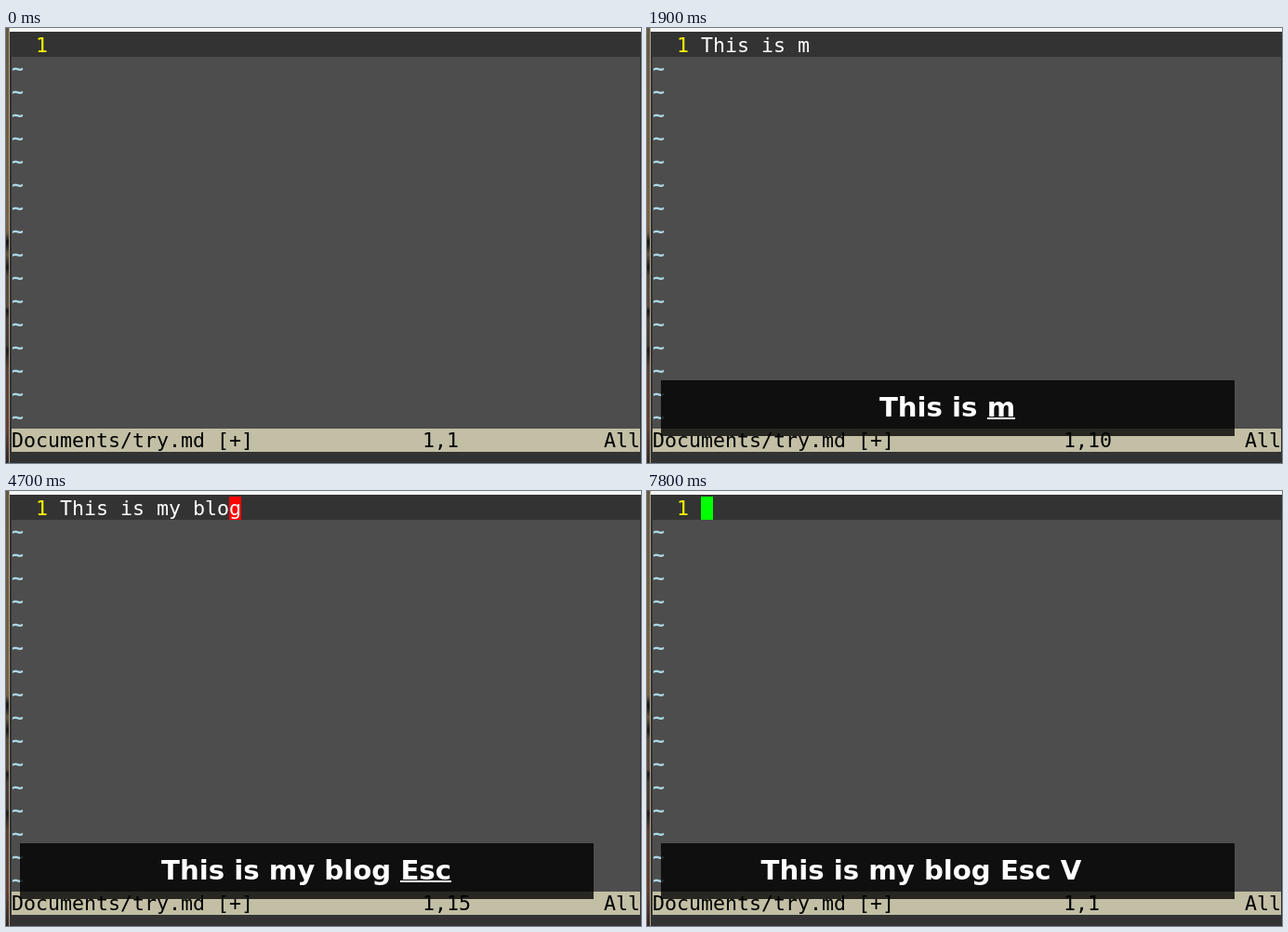
An HTML page that plays this animation: 683x468 px, repeating every 8000 ms.

```html
<!DOCTYPE html>
<html lang="en">
<head>
<meta charset="utf-8">
<title>Typing in an editor</title>
<style>
  html, body { margin: 0; width: 100%; height: 100%; overflow: hidden; background: #333; }
  #stage { position: relative; width: 683px; height: 468px; overflow: hidden; background: #333;
    font: 21.6px/25px "DejaVu Sans Mono", monospace; font-kerning: none; color: #fff; }
  #stage div { position: absolute; white-space: pre; }
  #top { left: 4px; top: 0; width: 679px; height: 4px; background: #f5f7f5; }
  #desk { left: 0; top: 0; width: 3px; height: 468px;
    background: linear-gradient(#66573f, #7a623d 45%, #77603f 47%, #1d1713 49%, #25201a 50%,
      #6b573b 52%, #1e1814 55%, #574633 57%, #5b4a35 64%, #1c1714 65%, #4c3d2f 67%,
      #46382c 73%, #211b17 74%, #5a4030 78%, #643f2d 92%, #33261f); }
  #edge { left: 3px; top: 0; width: 1px; height: 468px; background: #aaa698; }
  #page { left: 6px; top: 31px; width: 676px; height: 400px; background: #4d4d4d;
    color: #add8e6; font-weight: bold; }
  #number { left: 32px; top: 6px; color: #ff0; }
  #line { left: 58px; top: 6px; height: 25px; }
  #line.visual { background: #6b8e23; color: #f0e68c; }
  #cursor { top: 6px; width: 13px; height: 25px; background: #0f0; }
  #cursor.normal { background: #f00; }
  #status { left: 6px; top: 431px; width: 676px; height: 25px; background: #c2bfa5; color: #000; }
  #ruler { left: 442px; }
  #extent { left: 637px; }
  #keys { left: 15px; top: 379px; width: 617px; height: 60px; background: rgba(0, 0, 0, .8); }
  #typed { left: 0; top: 12px; width: 616px; text-align: center;
    font: bold 29.2px/34px "DejaVu Sans", sans-serif; }
  #typed span { position: relative; }
  #typed .blank { display: inline-block; width: 46px; }
  #typed .fresh::after { content: ""; position: absolute; left: 0; right: 0; top: 28px;
    height: 2px; background: #fff; }
</style>
</head>
<body>
<div id="stage">
  <div id="top"></div><div id="desk"></div><div id="edge"></div>
  <div id="page"></div>
  <div id="number">1</div>
  <div id="line"></div>
  <div id="cursor"></div>
  <div id="status">Documents/try.md [+]<div id="ruler" style="top:0"></div><div id="extent" style="top:0">All</div></div>
  <div id="keys"><div id="typed"></div></div>
</div>
<script>
const LOOP = 8000, CELL = 13, LEFT = 58, FRESH = 200;
const ESCAPE = 4700, VISUAL = 5600, CHANGE = 7400, CLEARED = 7500;
const TEXT = "This is my blog";

// When each letter reaches the key display and the buffer.
const shown = [400, 500, 600, 700, 1200, 1400, 1500, 1700, 1800, 2200, 2400, 2800, 3000, 3200, 3600];
const entered = [400, 600, 700, 800, 1200, 1400, 1500, 1700, 1900, 2200, 2600, 2800, 3000, 3200, 3700];
// The cursor starts hidden and flips at each of these times.
const blinks = [100, 400, 800, 1100, 1400, 1800, 2200, 2600, 2800, 3200, 3400, 3800,
  4000, 4400, ESCAPE, 7600, 7800];

const keys = [
  ...shown.map((at, i) => ({ at, label: TEXT[i] })),
  { at: ESCAPE, label: "Esc", gap: " " },
  { at: VISUAL, label: "V", gap: " " },
  { at: CHANGE, label: "\u00a0", gap: " ", blank: true }
];

const el = id => document.getElementById(id);
const count = (times, t) => times.filter(at => at <= t).length;

el("page").textContent = Array(16).fill("~").join("\n");

function keyMarkup(t) {
  const pressed = keys.filter(key => key.at <= t);
  return pressed.map((key, i) => {
    const fresh = i === pressed.length - 1 && t < key.at + FRESH;
    const names = [key.blank && "blank", fresh && "fresh"].filter(Boolean).join(" ");
    return (key.gap || "") + (names ? `<span class="${names}">${key.label}</span>` : key.label);
  }).join("");
}

function draw(t) {
  const length = t < CLEARED ? count(entered, t) : 0;
  const normal = t >= ESCAPE && t < CLEARED;
  const visual = t >= VISUAL && t < CLEARED;
  const column = normal ? length - 1 : length;

  el("line").textContent = TEXT.slice(0, length);
  el("line").className = visual ? "visual" : "";
  el("cursor").className = normal ? "normal" : "";
  el("cursor").textContent = normal ? TEXT[column] : "";
  el("cursor").style.left = LEFT + column * CELL + "px";
  el("cursor").style.visibility = count(blinks, t) % 2 ? "visible" : "hidden";
  el("ruler").textContent = "1," + (column + 1);
  el("keys").style.visibility = t < shown[0] ? "hidden" : "visible";
  el("typed").innerHTML = keyMarkup(t);
}

const start = performance.now();
let last = -1;
function tick() {
  const t = (performance.now() - start) % LOOP;
  const step = Math.floor(t / 100);
  if (step !== last) draw(step * 100);
  last = step;
  requestAnimationFrame(tick);
}
tick();
</script>
</body>
</html>
```
